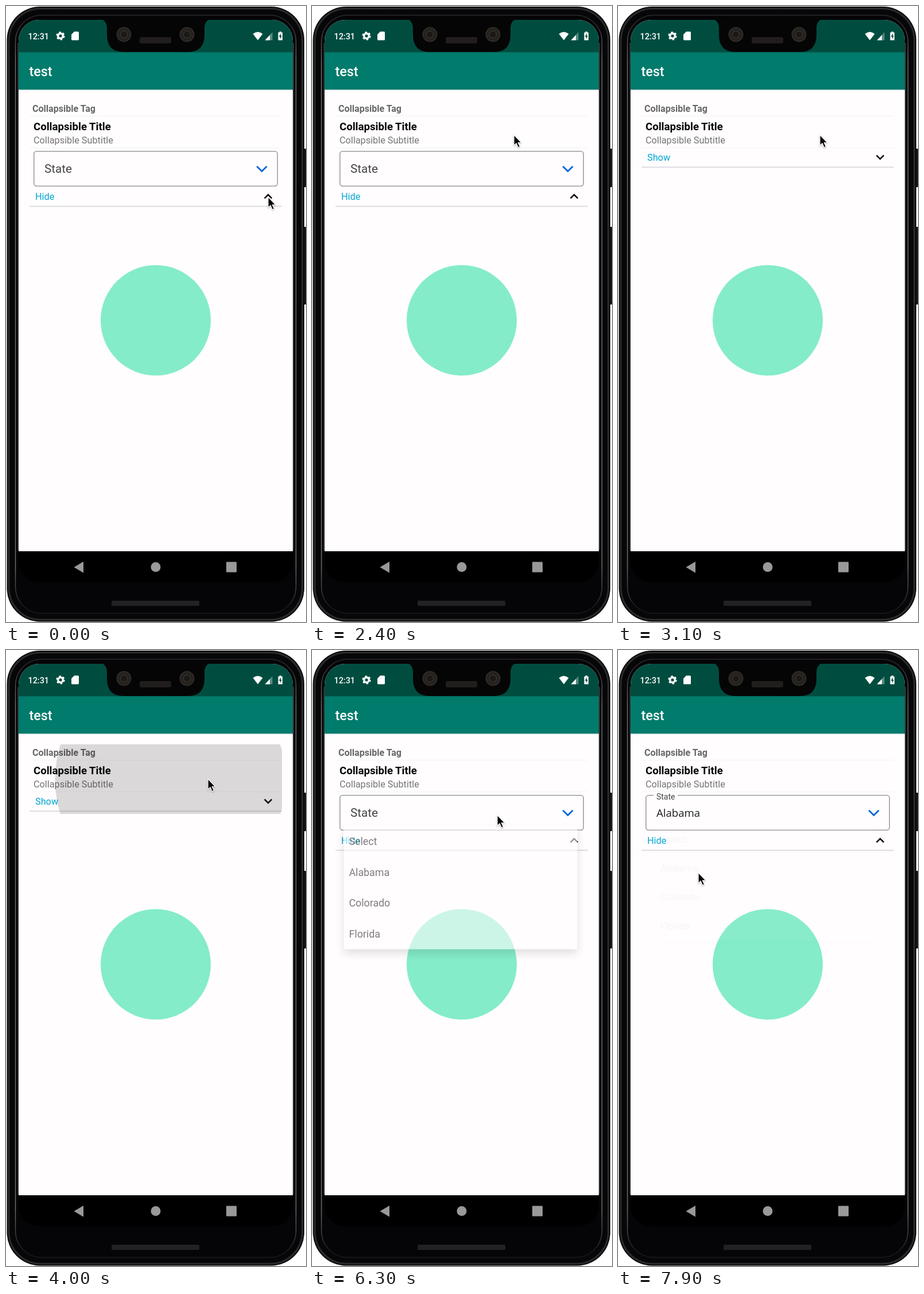
Animation, 523 px wide and 1071 px high, one loop 8 s. Source, as an HTML page:

```html
<!DOCTYPE html>
<html lang="en">
<head>
<meta charset="utf-8">
<title>Collapsible card</title>
<style>
html, body { margin: 0; width: 100%; height: 100%; overflow: hidden; background: #fff; }
svg { display: block; width: 523px; height: 1071px; }
text { font-family: Roboto, "Noto Sans", sans-serif; white-space: pre; }
.menu-panel { filter: drop-shadow(0 8px 8px rgba(0,0,0,.2)); }
.arrow { filter: drop-shadow(0 1px 1px rgba(0,0,0,.3)); }
</style>
</head>
<body>
<svg viewBox="0 0 523 1071">
  <defs>
    <linearGradient id="gleam" x2="0" y2="1">
      <stop offset=".01" stop-color="#2a292b"/><stop offset=".08" stop-color="#6c6b6d"/>
      <stop offset=".92" stop-color="#6c6b6d"/><stop offset=".99" stop-color="#1a191b"/>
    </linearGradient>
    <clipPath id="screen"><rect x="22" y="24" width="478" height="978" rx="36"/></clipPath>
    <clipPath id="cardClip"><rect id="cardArea" x="41" y="164" width="440"/></clipPath>
    <clipPath id="fieldClip"><rect id="fieldArea" x="48" width="426"/></clipPath>
    <clipPath id="labelClip"><rect id="labelArea" x="48" width="380"/></clipPath>
  </defs>

  <!-- phone body -->
  <rect x="518" y="248" width="5" height="67" rx="1" fill="#151515"/>
  <rect x="518" y="384" width="5" height="135" rx="1" fill="#151515"/>
  <rect x="1.500" y="1" width="518.500" height="1069.500" rx="58" fill="#0b0b0b"/>
  <rect x="5" y="4.500" width="511.500" height="1062.500" rx="55" fill="#070608" stroke="#2a292b" stroke-width="3"/>
  <rect x="16.500" y="16" width="489" height="1040" rx="46" fill="#050406" stroke="url(#gleam)" stroke-width="1.500"/>
  <path d="M21 64V946M501 64V946" stroke="#4c4b4d" stroke-width="1.300"/>
  <rect x="184" y="1034" width="153" height="9" rx="2" fill="#222123"/>

  <!-- screen -->
  <g clip-path="url(#screen)">
    <rect x="22" y="24" width="478" height="924" fill="#fffdfe"/>
    <rect x="22" y="24" width="478" height="57" fill="#004d40"/>
    <rect x="22" y="80.500" width="478" height="65" fill="#007b6c"/>
    <rect x="22" y="145.500" width="478" height="1.500" fill="#000" opacity=".06"/>
    <rect x="22" y="948" width="478" height="54" fill="#000"/>
  </g>
  <path d="M164 22Q176 25 176 39V50Q176 80 205 80H317Q346 80 346 50V39Q346 25 358 22Z" fill="#050505"/>
  <g fill="#24211e" stroke="#302c28" stroke-width="2">
    <circle cx="205.500" cy="49.500" r="12"/><circle cx="315.500" cy="49.500" r="12"/>
  </g>
  <g fill="#1b1916" stroke="#423d37">
    <circle cx="205.500" cy="49.500" r="6"/><circle cx="315.500" cy="49.500" r="6"/>
  </g>
  <rect x="233" y="54" width="55" height="11" rx="3" fill="#211d1d"/>

  <!-- status bar -->
  <g fill="#fff">
    <text x="38.500" y="57.500" font-size="14.400" font-weight="500">12:31</text>
    <circle cx="95" cy="52" r="4.300" fill="none" stroke="#fff" stroke-width="3.400"/>
    <circle cx="95" cy="52" r="6.400" fill="none" stroke="#fff" stroke-width="2.400" stroke-dasharray="3.400 3.300"/>
    <path d="M119 44.500H125.500Q127 44.500 127 46V58Q127 59.500 125.500 59.500H115.500Q114 59.500 114 58V49.500Z"/>
    <path d="M430.500 48.500Q439 41.500 447.500 48.500L439 59.500Z"/>
    <path d="M464.500 45.500V59.500H451.500Z" opacity=".35"/>
    <path d="M460 50.500V59.500H451.500Z"/>
    <path d="M474.500 46H476.500V44.500H480V46H482V59.500H474.500Z"/>
    <path d="M479 47.500L475.800 53.500H478V57.500L480.900 51.700H479Z" fill="#004d40"/>
    <text x="40.500" y="122" font-size="23.300" font-weight="500">test</text>
  </g>
  <g fill="#999">
    <path d="M135 966V985.500L118.500 975.700Z"/>
    <circle cx="261" cy="975.500" r="8.500"/>
    <rect x="384" y="966.500" width="18" height="18" rx="1"/>
  </g>

  <circle cx="261" cy="546.500" r="96" fill="#84ecc9"/>

  <!-- card -->
  <text x="46" y="184" font-size="16.050" font-weight="700" fill="#666567">Collapsible Tag</text>
  <path d="M41 191.500H481M41 246.500H481" stroke="#f4f3f5"/>
  <text x="48" y="216" font-size="18.600" font-weight="700" fill="#050505">Collapsible Title</text>
  <text x="48" y="238.500" font-size="16.280" fill="#757476">Collapsible Subtitle</text>
  <g id="field">
    <rect id="outline" x="48.700" y="252.700" width="424.600" rx="4.500" fill="none" stroke="#8b8a8c" stroke-width="1.300"/>
    <rect id="gap" x="62" y="251" height="4" fill="#fffdfe"/>
    <g clip-path="url(#labelClip)">
      <text id="label" x="67" fill="#434246">State</text>
      <text id="value" x="67" y="290" font-size="18.600" fill="#1c1b1d" style="font-family:'Open Sans','Noto Sans',sans-serif">Alabama</text>
    </g>
    <g clip-path="url(#fieldClip)">
      <path id="dropIcon" d="M-8.700 -4.300L0 4.300L8.700 -4.300" fill="none" stroke="#0065dc" stroke-width="2.700"/>
    </g>
  </g>
  <g id="footer">
    <text id="toggle" x="51" y="6" font-size="16.280" fill="#00a7d1"></text>
    <path id="chevron" d="M-6.300 -3.300L0 3L6.300 -3.300" fill="none" stroke="#0a0a0a" stroke-width="2.600"/>
    <path d="M41 17.300H481" stroke="#dedde1" stroke-width="2"/>
  </g>
  <g clip-path="url(#cardClip)"><circle id="ripple" cy="225"/></g>

  <!-- popup menu -->
  <g id="menu">
    <rect class="menu-panel" x="48" y="308" width="425" height="223.500" rx="2" fill="#fffdfe"/>
    <rect id="rowTint" x="48" y="364" width="425" height="56" fill="#000"/>
    <g id="rows" font-size="18.600" fill="#232225"></g>
  </g>

  <path id="cursor" class="arrow" d="M0 -1V17.500L4.200 13.700L7.400 21L10.500 19.600L7.300 12.500H13Z" fill="#050505" stroke="#fff" stroke-width="1.200" stroke-linejoin="round"/>
</svg>
<script>
const LOOP = 8000;
const $ = id => document.getElementById(id);
const set = (id, attrs) => {
  for (const name in attrs) $(id).setAttribute(name, attrs[name]);
};
const ramp = (t, start, length) => Math.min(1, Math.max(0, (t - start) / length));
const smooth = p => (1 - Math.cos(Math.PI * p)) / 2;
const mix = (a, b, p) => a + (b - a) * p;

["Select", "Alabama", "Colorado", "Florida"].forEach((name, i) => {
  const row = document.createElementNS("http://www.w3.org/2000/svg", "text");
  row.textContent = name;
  row.setAttribute("x", 57.5);
  row.setAttribute("y", 342.5 + i * 55.8);
  $("rows").append(row);
});

// Pointer legs: start, duration, destination; the vertical part leads slightly
const moves = [[1520, 750, 352, 225], [5450, 600, 323, 288], [6450, 750, 140, 388]];
const LEAD = 50;
// Card presses: down, release
const presses = [[2450, 2660], [3872, 4600]];

function drawCursor(t) {
  let x = 457, y = 333;
  for (const [start, length, toX, toY] of moves) {
    x = mix(x, toX, smooth(ramp(t, start, length)));
    y = mix(y, toY, smooth(ramp(t, start - LEAD, length)));
  }
  set("cursor", { transform: `translate(${x} ${y})` });
}

function drawCard(t) {
  const folded = smooth(ramp(t, 2700, 360)) - smooth(ramp(t, 4700, 360));
  const height = 61 - 68 * folded;
  const open = height > 2;
  const footerY = 331 - 68 * folded;
  const middle = 252.5 + height / 2;

  $("field").style.display = open ? "" : "none";
  if (open) {
    set("outline", { height: Math.max(0, height - 0.6) });
    set("fieldArea", { y: 252, height });
    set("labelArea", folded ? { y: 269, height: Math.max(0, height - 34) } : { y: 240, height: 80 });
    set("dropIcon", { transform: `translate(446 ${middle})` });
  }

  const chosen = t >= 7720;
  const lift = smooth(ramp(t, 7720, 167));
  set("label", { y: mix(middle + 7, 260.3, lift), "font-size": mix(20.6, 13.95, lift) });
  set("gap", { width: 42 * lift });
  $("value").style.display = chosen ? "" : "none";

  $("toggle").textContent = t >= 2660 && t < 4600 ? "Show" : "Hide";
  set("footer", { transform: `translate(0 ${footerY})` });
  set("chevron", { transform: `translate(457 0) rotate(${-180 * (1 - folded)})` });
  set("cardArea", { height: footerY + 22 - 164 });
}

function drawRipple(t) {
  const [down, release] = presses[t < 3500 ? 0 : 1];
  const p = smooth(ramp(t, down, 200));
  const span = Math.hypot(220, t < 3500 ? 95 : 61);
  const fade = 1 - ramp(t, release, 250);
  set("ripple", {
    cx: mix(352, 261, p),
    r: mix(128, span + 1, p),
    opacity: t < down ? 0 : 0.145 * fade ** 0.6
  });
}

function drawMenu(t) {
  const shown = ramp(t, 6225, 130) - ramp(t, 7740, 166);
  const scale = 0.9 + 0.1 * shown;
  set("menu", {
    opacity: shown,
    transform: `translate(225 262) scale(${scale}) translate(-225 -262)`
  });
  set("rowTint", { opacity: 0.12 * (ramp(t, 7560, 120) - ramp(t, 7720, 140)) });
}

function draw(t) {
  drawCard(t);
  drawRipple(t);
  drawMenu(t);
  drawCursor(t);
}

const began = performance.now();
function tick() {
  draw((performance.now() - began) % LOOP);
  requestAnimationFrame(tick);
}
tick();
</script>
</body>
</html>
```
